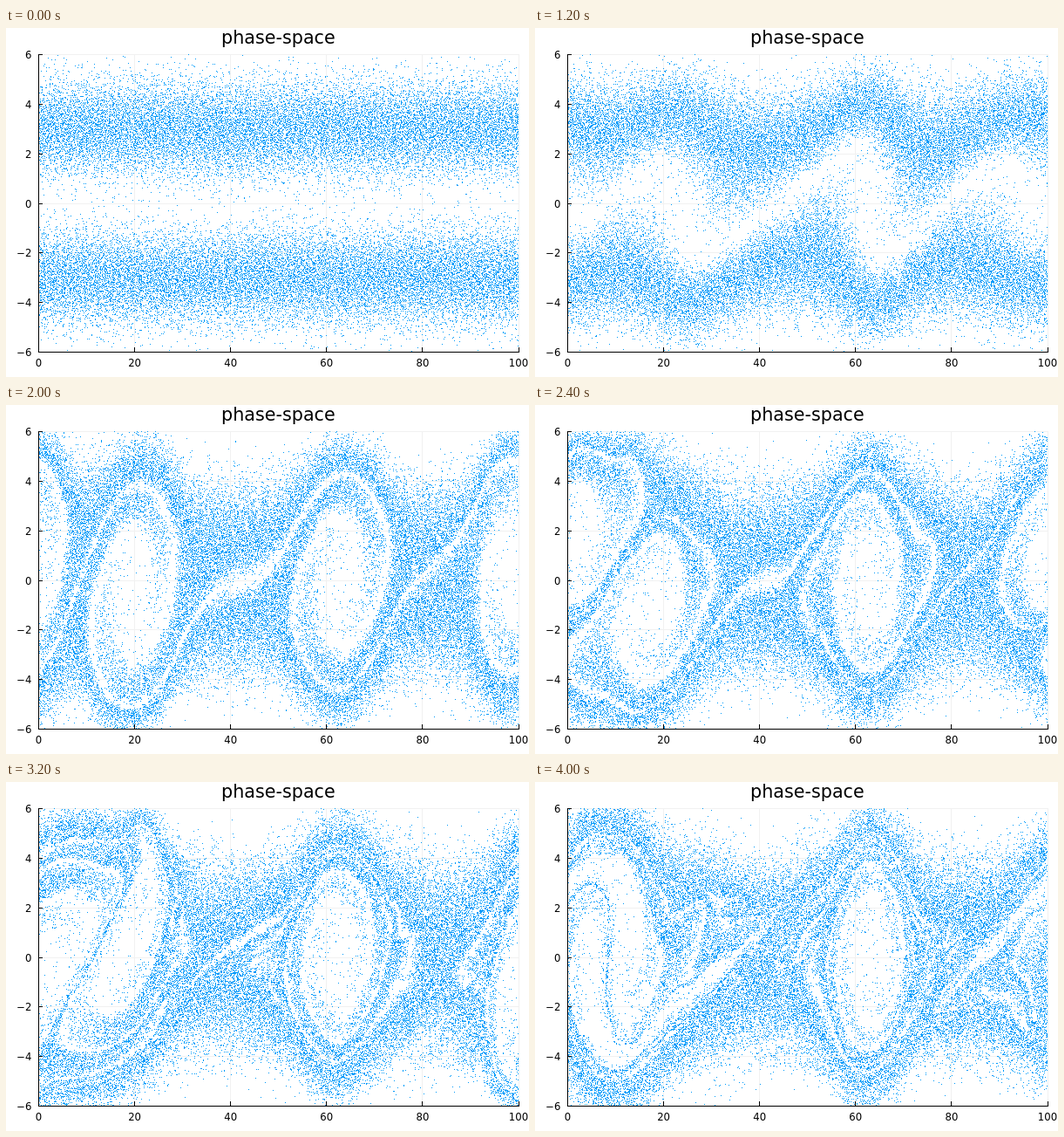
Recreate the animation shown at these times as an HTML page with a canvas. Size 600 by 400 pixels, loop 4200 ms.

```html
<!DOCTYPE html>
<html lang="en">
<head>
<meta charset="utf-8">
<title>phase-space</title>
<style>
  html, body { margin: 0; width: 100%; height: 100%; overflow: hidden; background: #fff; }
  canvas { display: block; }
</style>
</head>
<body>
<canvas id="stage" width="600" height="400"></canvas>
<script>
const W = 600, H = 400, FRAMES = 21, HOLD = 200;
const LEFT = 37, RIGHT = 588, TOP = 30, BOTTOM = 371;
const FONT = '"DejaVu Sans", sans-serif';
const DOT = [0, 154, 250];

// Two-stream instability, particle-in-cell
const N = 36000, L = 100, CELLS = 128, DX = L / CELLS;
const BEAM = 3, DT = 0.2, STEPS = 10, SEED_TIME = 8;

// Growing modes: wave number, growth rate, field strength at SEED_TIME, phase in degrees
const MODES = [
  [1, 0.145, 0.018, 55],
  [2, 0.237, 0.06, -28],
  [3, 0.286, 0.15, 144],
  [4, 0.28, 0.03, -110]
].map(([m, rate, amp, deg]) => ({
  k: 2 * Math.PI * m / L,
  rate,
  amp: amp * Math.exp(-rate * SEED_TIME),
  phase: deg * Math.PI / 180
}));

let state = 20231;
function random() {
  state = (state + 0x6D2B79F5) | 0;
  let t = Math.imul(state ^ (state >>> 15), 1 | state);
  t = (t + Math.imul(t ^ (t >>> 7), 61 | t)) ^ t;
  return ((t ^ (t >>> 14)) >>> 0) / 4294967296;
}

const wrap = x => { x %= L; return x < 0 ? x + L : x; };
const normal = u => 4.91 * (Math.pow(u, 0.14) - Math.pow(1 - u, 0.14));

const pos = new Float64Array(N), vel = new Float64Array(N);
const density = new Float64Array(CELLS), accel = new Float64Array(CELLS);

// Evenly spread start, nudged along the growing modes
function load() {
  const golden = (Math.sqrt(5) - 1) / 2;
  for (let i = 0; i < N; i++) {
    const x = L * (i + 0.5) / N + (random() - 0.5) * 1.6;
    const u = (i * golden + (random() - 0.5) * 0.02 + 1) % 1;
    const half = Math.min(Math.max((u * 2) % 1, 1e-6), 1 - 1e-6);
    const v = (u < 0.5 ? -BEAM : BEAM) + normal(half);
    let dx = 0, dv = 0;
    for (const { k, rate, amp, phase } of MODES) {
      const size = Math.hypot(rate, k * v), turn = Math.atan2(k * v, rate);
      const angle = k * x + phase;
      dv += amp / size * Math.cos(angle - turn);
      dx += amp / (size * size) * Math.cos(angle - 2 * turn);
    }
    pos[i] = wrap(x + dx);
    vel[i] = v + dv;
  }
}

function solveField() {
  density.fill(0);
  for (let i = 0; i < N; i++) {
    const p = pos[i] / DX, j = Math.floor(p), f = p - j;
    density[j % CELLS] += 1 - f;
    density[(j + 1) % CELLS] += f;
  }
  let face = 0, mean = 0;
  for (let j = 0; j < CELLS; j++) {
    const rise = (density[j] * CELLS / N - 1) * DX;
    accel[j] = face + rise / 2;
    face += rise;
    mean += accel[j] / CELLS;
  }
  for (let j = 0; j < CELLS; j++) accel[j] -= mean;
}

function step() {
  solveField();
  for (let i = 0; i < N; i++) {
    const p = pos[i] / DX, j = Math.floor(p), f = p - j;
    vel[i] += DT * (accel[j % CELLS] * (1 - f) + accel[(j + 1) % CELLS] * f);
    pos[i] = wrap(pos[i] + vel[i] * DT);
  }
}

const px = x => LEFT + 0.5 + x * 5.505;
const py = v => 201 - v * 28.417;

function plotDots() {
  const c = document.createElement('canvas');
  c.width = W;
  c.height = H;
  const g = c.getContext('2d');
  const img = g.createImageData(W, H), d = img.data;
  for (let i = 0; i < N; i++) {
    const x = Math.floor(px(pos[i])), y = Math.floor(py(vel[i]));
    if (x < LEFT || x > RIGHT || y < TOP || y > BOTTOM) continue;
    const o = (y * W + x) * 4;
    d.set(DOT, o);
    d[o + 3] = 255;
  }
  g.putImageData(img, 0, 0);
  return c;
}

const ctx = document.getElementById('stage').getContext('2d');
const xTicks = [0, 20, 40, 60, 80, 100], yTicks = [-6, -4, -2, 0, 2, 4, 6];

function bar(x, y, w, h, color) {
  ctx.fillStyle = color;
  ctx.fillRect(x, y, w, h);
}

function label(text, x, y, size, align) {
  ctx.font = size + 'px ' + FONT;
  ctx.textAlign = align;
  ctx.fillStyle = '#000';
  ctx.fillText(text, x, y);
}

function draw(dots) {
  bar(0, 0, W, H, '#fff');
  for (const x of xTicks) bar(Math.floor(px(x)), TOP, 1, BOTTOM - TOP, '#f1f1f1');
  for (const v of yTicks) bar(LEFT, Math.floor(py(v)), RIGHT - LEFT, 1, '#f1f1f1');
  ctx.drawImage(dots, 0, 0);
  bar(LEFT, TOP, 1, BOTTOM - TOP + 1, '#000');
  bar(LEFT, BOTTOM, RIGHT - LEFT + 1, 1, '#000');
  for (const x of xTicks) {
    bar(Math.floor(px(x)), BOTTOM - 5, 1, 5, '#000');
    label(String(x), px(x), 387.6, 11.7, 'center');
  }
  for (const v of yTicks) {
    bar(LEFT, Math.floor(py(v)), 5, 1, '#000');
    label(String(v).replace('-', '\u2212'), 29.5, py(v) + 4.6, 11.7, 'right');
  }
  label('phase-space', 312.4, 18, 20.7, 'center');
}

load();
const frames = [];
for (let f = 0; f < FRAMES; f++) {
  frames.push(plotDots());
  for (let s = 0; s < STEPS; s++) step();
}

let start = null, shown = 0;
function tick(now) {
  if (start === null) start = now;
  const f = Math.floor((now - start) / HOLD) % FRAMES;
  if (f !== shown) draw(frames[shown = f]);
  requestAnimationFrame(tick);
}
draw(frames[0]);
requestAnimationFrame(tick);
</script>
</body>
</html>
```
